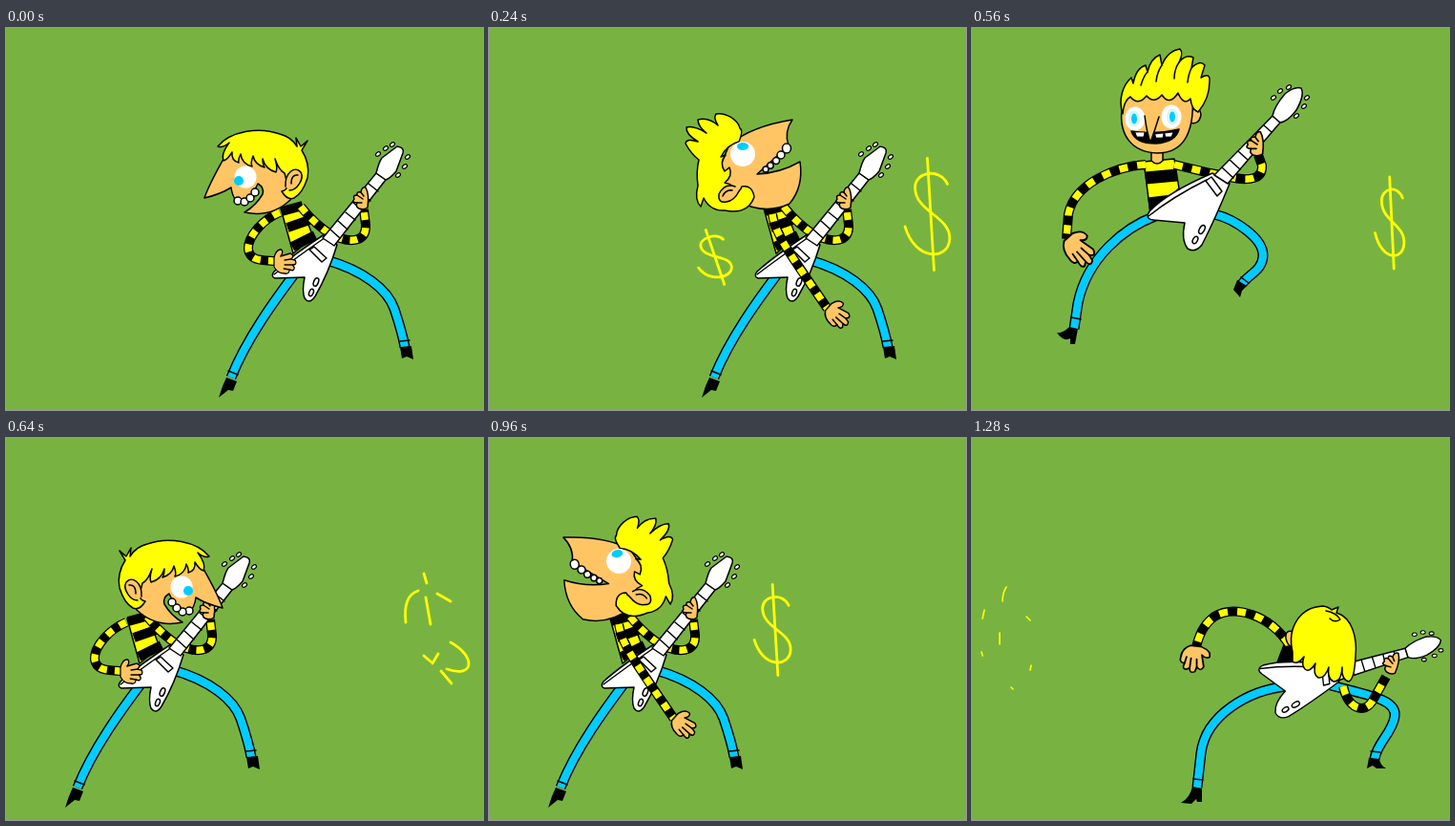
Write an HTML page without scripts that moves like this. It is 500 px wide and 400 px high and loops after 1.36 s.

```html
<!DOCTYPE html>
<html lang="en">
<head>
<meta charset="utf-8">
<title>Guitar jump</title>
<style>
html, body { margin: 0; width: 100%; height: 100%; overflow: hidden; background: #78b342; }
svg { display: block; width: 100vw; height: 100vh; }

.shape { stroke: #000; stroke-width: 1.5; stroke-linejoin: round; stroke-linecap: round; }
.skin { fill: #ffc565; }
.hair { fill: #ff0; }
.white { fill: #fff; }
.eye { fill: #fff; stroke: none; }
.iris { fill: #0cf; stroke: none; }
.halo { stroke: #d5f5ff; stroke-width: 3; }
.line { fill: none; }
.shoe { fill: #000; stroke: none; }
.leg-edge, .leg, .sleeve-edge, .sleeve { fill: none; stroke: #000; }
.leg-edge { stroke-width: 11; }
.leg { stroke: #0cf; stroke-width: 8.2; }
.sleeve-edge { stroke-width: 10; }
.sleeve { stroke: #ff0; stroke-width: 7.4; stroke-dasharray: 8 8; }
.wide { stroke-dasharray: 9 10; }
.bands { fill: none; stroke: #000; stroke-width: 10; }
.thick { stroke-width: 13; }
.coin, .spark { fill: none; stroke: #ff0; stroke-linecap: round; vector-effect: non-scaling-stroke; }
.coin { stroke-width: 2.8; }
.spark { stroke-width: 1.6; }

/* --at: first 80 ms step shown; one1..one4: number of steps held */
.on { visibility: hidden; animation: one1 1360ms step-end infinite; animation-delay: calc(var(--at) * 80ms - 1360ms); }
.x2 { animation-name: one2; }
.x4 { animation-name: one4; }
@keyframes one1 { 0% { visibility: visible; } 5.88235%, 100% { visibility: hidden; } }
@keyframes one2 { 0% { visibility: visible; } 11.76470%, 100% { visibility: hidden; } }
@keyframes one4 { 0% { visibility: visible; } 23.52941%, 100% { visibility: hidden; } }
</style>
</head>
<body>
<svg viewBox="0 0 500 400" preserveAspectRatio="none">
<defs>
  <ellipse id="peg" rx="2.7" ry="1.9" stroke-width="1.2" transform="rotate(-35)"/>
  <g id="guitar" class="shape white">
    <path d="M334 216 Q300 238 281 255 Q277 260 282 262 L313 261 Q310 275 313 283 Q318 290 324 281 Q338 257 347 227 Z"/>
    <path class="line" d="M281 258 Q305 240 335 219"/>
    <path d="M332 220 L388 152 L398 159 L344 228 Z"/>
    <path class="line" d="M340 211 l10 9 M348 202 l10 9 M356 193 l10 8 M364 183 l10 8 M372 173 l10 8 M380 163 l10 8"/>
    <path d="M388 152 Q391 140 394 136 L410 124 Q418 125 416 131 L409 150 Q402 158 398 159 Z"/>
    <path d="M318 232 L323 229 L336 241 L331 245 Z"/>
    <ellipse cx="325" cy="266" rx="2.4" ry="4.5" transform="rotate(22 325 266)"/>
    <ellipse cx="320" cy="277" rx="2.2" ry="3.8" transform="rotate(22 320 277)"/>
    <use href="#peg" x="390" y="132"/><use href="#peg" x="398" y="126"/><use href="#peg" x="405" y="122"/>
    <use href="#peg" x="421" y="135"/><use href="#peg" x="418" y="145"/><use href="#peg" x="411" y="154"/>
  </g>
  <g id="round-guitar" class="shape white">
    <path d="M252 152 Q205 172 186 192 Q181 200 190 201 Q212 203 223 204 Q219 222 226 231 Q234 236 241 227 Q254 202 270 163 Z"/>
    <path class="line" d="M185 197 Q210 177 246 159"/>
    <path d="M254 154 L315 92 L323 99 L268 163 Z"/>
    <path class="line" d="M262 146 l12 11 M270 138 l11 10 M279 129 l10 9 M288 120 l9 8 M297 111 l8 8 M306 102 l8 7"/>
    <path d="M315 92 Q317 82 328 69 Q338 61 345 63 Q349 70 340 86 Q331 98 323 99 Z"/>
    <path d="M245 160 L251 156 L262 171 L257 176 Z"/>
    <ellipse cx="241" cy="211" rx="2.6" ry="4.8" transform="rotate(28 241 211)"/>
    <ellipse cx="234" cy="222" rx="2.4" ry="4" transform="rotate(28 234 222)"/>
    <use href="#peg" x="316" y="73"/><use href="#peg" x="323" y="66"/><use href="#peg" x="332" y="62"/>
    <use href="#peg" x="351" y="73"/><use href="#peg" x="348" y="82"/><use href="#peg" x="340" y="92"/>
  </g>

  <g id="palm" class="shape skin">
    <path d="M0 -5 Q3 -14 9 -13 Q12 -10 8 -6 L20 -9 Q26 -7 21 -3 L26 -2 Q29 3 23 3 L25 6 Q25 10 19 8 Q19 13 13 12 Q4 12 0 5 Z"/>
    <path class="line" d="M21 -3 L13 -2 M23 3 L13 3 M19 8 L12 7"/>
  </g>
  <g id="grip" class="shape skin">
    <path d="M-3 10 Q-7 8 -5 4 Q-11 4 -8 0 Q-10 -4 -5 -4 Q-6 -8 -1 -7 Q0 -13 4 -12 Q8 -5 6 9 Q2 12 -3 10 Z"/>
    <path class="line" d="M-5 4 L0 4 M-5 -4 L1 0 M-1 -7 L2 -3"/>
  </g>

  <g id="stance">
    <g class="leg-edge"><path id="stance-legs" d="M302 258 C284 282 252 325 236 366 M336 243 C375 254 400 274 407 294 C413 312 416 322 418 334"/></g>
    <use href="#stance-legs" class="leg"/>
    <path class="shape" d="M233 359 l10 4 M413 328 l10 -1"/>
    <path class="shoe" d="M231 366 L242 370 L238 380 L233 379 L223 387 L227 375 Z M413 334 L425 333 L427 347 L420 344 L415 346 Z"/>
    <path class="shape hair" d="M288 189 L309 185 L322 219 L301 236 Z"/>
    <path class="bands" d="M289 192 L311 186 M295 209 L318 201 M300 229 L324 217"/>
    <g class="sleeve-edge"><path id="stance-arm" d="M309 187 Q324 206 342 217 L350 220 C365 225 378 222 377 206 L375 190"/></g>
    <use href="#stance-arm" class="sleeve"/>
    <use href="#guitar"/>
    <use href="#grip" x="373" y="179"/>
  </g>

  <g id="strum">
    <use href="#stance"/>
    <g class="sleeve-edge"><path id="strum-arm" d="M287 193 C270 200 253 218 254 232 C256 244 268 243 282 244"/></g>
    <use href="#strum-arm" class="sleeve"/>
    <use href="#palm" transform="translate(281 245) scale(.85 1)"/>
  </g>
  <g id="swing">
    <use href="#stance"/>
    <g class="sleeve-edge"><path id="swing-arm" d="M297 195 C300 215 312 232 355 294"/></g>
    <use href="#swing-arm" class="sleeve"/>
    <use href="#palm" transform="translate(356 292) rotate(42)"/>
  </g>

  <g id="head-down" class="shape">
    <path class="skin" d="M232 130 C222 148 213 163 208 178 Q225 174 236 167 Q237 176 242 182 Q256 181 264 163 Q271 167 269 174 Q262 186 250 193 Q278 199 298 180 L308 150 L290 120 Z"/>
    <g class="white"><circle cx="243" cy="181" r="4"/><circle cx="250" cy="182" r="4"/><circle cx="256" cy="178" r="4"/><circle cx="261" cy="172" r="4"/></g>
    <circle class="eye" cx="251" cy="156" r="11.5"/><circle class="iris" cx="244" cy="160" r="5"/>
    <path class="hair" d="M222 124 C235 108 265 103 287 111 Q299 114 305 124 L304 115 L309 124 L316 118 L310 128 Q319 142 316 157 Q311 173 302 178 Q295 181 289 171 Q295 170 295 164 L292 152 Q286 149 282 137 Q285 147 283 151 Q272 148 269 137 Q269 143 271 146 Q261 143 259 134 Q256 142 258 145 Q247 142 246 132 Q243 138 244 141 Q236 139 237 130 Q232 138 228 139 Q225 132 234 120 Q227 126 222 124 Z"/>
    <path class="skin" d="M293 166 C292 151 303 144 309 151 C313 158 305 170 297 170"/>
    <path class="line" d="M299 163 Q299 153 306 154"/>
  </g>

  <g id="head-up" class="shape">
    <path class="skin" d="M252 122 Q275 103 318 96 Q309 109 314 123 L281 153 Q305 152 326 140 Q330 166 315 184 Q290 196 262 182 L236 160 Z"/>
    <g class="white"><ellipse cx="312" cy="126" rx="4.5" ry="5"/><circle cx="306" cy="133" r="4"/><circle cx="301" cy="139" r="3.5"/><circle cx="295" cy="144" r="3.2"/><circle cx="290" cy="148" r="3"/></g>
    <path class="hair" d="M262 119 Q267 107 263 105 C261 96 248 88 238 90 Q235 94 240 102 Q230 93 219 96 Q219 103 228 110 Q215 102 207 104 Q206 111 219 119 Q207 115 206 121 Q212 132 220 138 Q217 150 219 165 Q215 180 222 187 L225 178 Q232 192 247 191 Q271 196 278 177 Q276 164 265 166 Q264 170 259 173 Q258 164 247 162 Q256 155 252 146 L247 150 Q241 141 248 133 L243 135 Q250 122 262 119 Z"/>
    <circle class="eye" cx="266" cy="132" r="13"/><ellipse class="iris" cx="266" cy="124" rx="6" ry="4"/>
    <path class="skin" d="M258 166 Q247 162 241 174 Q240 184 249 182 Q257 181 262 171"/>
    <path class="line" d="M255 170 Q248 169 245 176"/>
  </g>

  <g id="leap-left">
    <g class="leg-edge"><path id="leap-left-legs" d="M192 197 C160 209 121 240 111 288 L107 315 M254 195 C275 200 306 220 305 239 C304 254 291 257 283 268"/></g>
    <use href="#leap-left-legs" class="leg"/>
    <path class="shape" d="M104 303 l10 2 M282 261 l8 6"/>
    <path class="shoe" d="M102 313 L111 315 L108 331 L103 331 L103 325 Q96 329 89 319 Q95 320 102 313 Z M278 264 L288 270 L283 275 L281 282 L274 274 Z"/>
    <path class="shape hair" d="M180 140 L212 137 L217 168 L187 194 Z"/>
    <path class="bands thick" d="M182 157 L215 154 M185 184 L218 180"/>
    <g class="sleeve-edge"><path id="leap-left-arms" d="M182 143 C150 145 107 163 101 195 L99 221 M212 143 L250 152 L275 157 C291 160 305 158 304 144 L300 133"/></g>
    <use href="#leap-left-arms" class="sleeve wide"/>
    <use href="#palm" transform="translate(101 219) rotate(48) scale(1.35 1.2)"/>
    <use href="#round-guitar"/>
    <use href="#grip" transform="translate(298 122) scale(1.1)"/>
    <g class="shape">
      <path class="skin" d="M188 125 V139 Q194 145 200 139 V125 Z"/>
      <path class="skin" d="M228 88 Q239 80 240 91 Q238 102 228 99"/>
      <path class="skin" d="M157 85 C154 113 168 130 194 131 C218 131 234 115 231 70 L160 68 Z"/>
      <path class="hair" d="M158 90 C153 75 158 60 167 52 L169 58 Q172 42 182 39 L184 46 Q187 32 197 28 L199 39 Q205 24 218 22 Q222 26 217 36 Q224 27 232 31 L230 42 Q239 33 244 39 L240 52 Q250 46 249 56 Q249 74 237 88 Q230 85 229 74 Q222 82 216 68 Q207 82 199 70 Q191 80 183 71 Q174 82 166 72 Q159 76 158 90 Z"/>
      <path class="line" d="M177 60 Q180 50 184 46 M193 56 Q194 46 199 39 M212 53 Q212 43 217 36 M226 57 Q227 48 230 42"/>
      <ellipse class="eye" cx="171" cy="95" rx="10.5" ry="12.5"/><ellipse class="eye" cx="209" cy="93" rx="10.5" ry="12.5"/>
      <ellipse class="iris halo" cx="170" cy="95" rx="4.5" ry="7"/><ellipse class="iris halo" cx="210" cy="93" rx="4.5" ry="7"/>
      <path d="M167 108 Q191 112 217 106 Q214 119 193 121 Q171 121 167 108 Z"/>
      <path class="white" stroke-width=".8" d="M171 109 h10 l-1 5 h-7 Z M192 111 l9 -1 l-1 5 h-7 Z M202 110 l9 -1 l-2 5 h-6 Z"/>
      <path class="skin" d="M181 92 Q183 108 187 120 Q192 106 196 93"/>
    </g>
  </g>

  <g id="leap-right">
    <g class="leg-edge"><path id="leap-right-legs" d="M198 184 C192 213 180 238 168 261 C158 276 145 291 126 313 M250 174 C285 179 302 205 302 229 C302 245 299 254 294 266"/></g>
    <use href="#leap-right-legs" class="leg"/>
    <path class="shape" d="M134 297 l6 9 M291 259 l9 3"/>
    <path class="shoe" d="M122 307 L131 317 L112 336 L114 328 L109 333 L110 320 Z M286 264 L299 267 L293 285 L290 278 L284 276 Z"/>
    <path class="shape hair" d="M195 114 L230 112 L229 168 L190 172 Z"/>
    <path class="bands thick" d="M193 128 L227 126 M190 158 L230 158"/>
    <g class="sleeve-edge"><path id="leap-right-arms" d="M200 114 C175 122 150 160 147 195 M230 114 C238 128 240 142 248 153 L262 165 C280 172 293 165 287 146"/></g>
    <use href="#leap-right-arms" class="sleeve"/>
    <use href="#palm" transform="translate(146 192) rotate(104) scale(.9 1.2)"/>
    <use href="#round-guitar" transform="translate(175 183) rotate(14) scale(.86) translate(-184 -197)"/>
    <use href="#grip" x="285" y="135"/>
    <g class="shape">
      <path class="skin" d="M201 75 L199 108 Q220 121 242 106 Q243 99 240 94 L255 111 Q256 93 250 72 Z"/>
      <path d="M220 92 Q230 100 243 100 Q242 109 233 109 Q222 105 220 92 Z"/>
      <path class="white" stroke-width=".7" d="M224 97 l5 2 -1 4 Z M230 100 h5 l-2 5 Z M236 102 h5 l-2 5 Z"/>
      <ellipse class="eye" cx="236" cy="82" rx="14" ry="10"/><ellipse class="iris" cx="234" cy="82" rx="3.5" ry="7" transform="rotate(20 234 82)"/>
      <path class="hair" d="M202 46 L194 55 L196 48 L193 47 L202 40 Q212 24 235 25 Q260 29 264 50 Q266 68 262 81 Q254 80 254 68 Q252 80 247 79 Q241 78 242 64 Q237 78 232 77 Q227 75 230 63 Q223 78 218 78 Q214 74 217 64 Q210 75 205 75 Q208 86 204 94 L208 101 L202 107 Q207 112 203 113 Q190 104 191 86 Q192 64 202 46 Z"/>
      <path class="skin" d="M204 80 Q196 70 194 83 Q196 98 204 94"/>
      <path class="line" d="M203 84 Q198 82 200 90"/>
    </g>
  </g>

  <g id="crouch">
    <g class="leg-edge"><path id="crouch-legs" d="M330 260 C290 264 245 290 240 330 L236 366 M376 259 C420 270 446 275 443 292 C440 310 425 318 422 336"/></g>
    <use href="#crouch-legs" class="leg"/>
    <path class="shape" d="M232 357 l10 1 M418 328 l10 1"/>
    <path class="shoe" d="M231 365 L241 367 L241 381 L236 381 L235 378 L230 383 L219 382 Q229 376 231 365 Z M416 335 L427 336 Q428 343 434 346 L424 346 L420 343 L414 346 Z"/>
    <path d="M326 217 L345 220 L345 240 L318 238 Z"/>
    <g class="sleeve-edge"><path id="crouch-arms" d="M332 216 C312 185 275 174 254 187 C242 196 238 207 235 219 M389 260 C394 283 411 290 420 275 L434 250"/></g>
    <use href="#crouch-arms" class="sleeve wide"/>
    <use href="#palm" transform="translate(235 218) rotate(98) scale(1.02 1.2)"/>
    <use href="#round-guitar" transform="translate(301 241) rotate(31) scale(.92) translate(-184 -197)"/>
    <use href="#grip" transform="translate(440 236) rotate(15)"/>
    <g class="shape">
      <path class="skin" d="M337 203 Q328 200 329 210 Q331 219 338 220"/>
      <path class="hair" d="M336 224 C330 198 344 177 368 176 Q374 177 377 180 L384 177 L382 183 C399 188 404 210 402 229 Q401 252 395 255 Q387 253 388 240 Q387 256 379 255 Q372 252 374 240 Q370 252 363 251 Q357 248 360 236 Q354 246 349 242 Q345 238 348 229 Q341 238 336 234 Z"/>
      <path class="line" d="M371 181 Q382 183 386 190 Q380 194 375 189"/>
    </g>
  </g>

  <path id="dollar" class="coin" d="M15 -27 C8 -42 -14 -38 -14 -24 C-14 -2 18 2 17 22 C16 42 -14 42 -23 11 M-3 -50 L3 50"/>
  <path id="broken" class="coin" d="M-33 -7 Q-36 -35 -20 -40 M-14 -58 L-11 -48 M-12 -33 L-7 -5 M0 -37 L14 -29 M-14 28 L-7 34 M-5 36 L1 26 M14 14 C40 28 40 52 10 42 M4 44 L15 57"/>
  <path id="sparks" class="spark" d="M-2 -95 v5 M-26 -60 l-5 5 M-31 -25 l4 10 M29 -67 l3 5 M-20 70 l9 8 M18 88 v5 M28 60 l4 -7"/>
</defs>

<rect width="500" height="400" fill="#78b342"/>

<use href="#dollar" class="on" style="--at:2" transform="translate(262 255) scale(.4)"/>
<use href="#dollar" class="on" style="--at:3" transform="translate(237 240) rotate(-14) scale(.85 .6)"/>
<use href="#dollar" class="on" style="--at:4" transform="translate(207 222) rotate(-8) scale(.9)"/>
<use href="#broken" class="on" style="--at:5" transform="translate(181 207)"/>
<use href="#sparks" class="on" style="--at:6" transform="translate(178 205)"/>

<use href="#dollar" class="on" style="--at:2" transform="translate(432 212) scale(.6)"/>
<use href="#dollar" class="on" style="--at:3" transform="translate(463 195) scale(1.17)"/>
<use href="#broken" class="on" style="--at:4" transform="translate(463 195) scale(.95 1.2)"/>
<use href="#sparks" class="on" style="--at:5" transform="translate(463 195)"/>

<use href="#dollar" class="on" style="--at:5" transform="translate(401 222) rotate(6) scale(.38 .45)"/>
<use href="#dollar" class="on" style="--at:6" transform="translate(420 212) rotate(4) scale(.6 .7)"/>
<use href="#dollar" class="on" style="--at:7" transform="translate(440 204) scale(.76 .96)"/>
<use href="#broken" class="on" style="--at:8" transform="translate(452 200)"/>
<use href="#sparks" class="on" style="--at:9" transform="translate(458 198)"/>

<use href="#dollar" class="on" style="--at:10" transform="translate(248 223) rotate(-12) scale(.55 .42)"/>
<use href="#dollar" class="on" style="--at:11" transform="translate(275 211) scale(.7)"/>
<use href="#dollar" class="on" style="--at:12" transform="translate(300 201) scale(.95)"/>
<use href="#broken" class="on" style="--at:13" transform="translate(318 194)"/>

<use href="#dollar" class="on" style="--at:13" transform="translate(68 221) rotate(10) scale(.5)"/>
<use href="#dollar" class="on" style="--at:14" transform="translate(53 218) rotate(6) scale(.8 .68)"/>
<use href="#broken" class="on" style="--at:15" transform="translate(42 213) scale(.8)"/>
<path class="spark on" style="--at:16" d="M36 156 Q32 162 32 171 M13 180 l-2 9 M57 187 l4 4 M29 204 v12 M10 224 l1 4 M62 238 l-1 5 M41 261 l2 2"/>

<g class="on x2" style="--at:0"><use href="#strum"/><use href="#head-down"/></g>
<g class="on x4" style="--at:2"><use href="#swing"/><use href="#head-up"/></g>
<use href="#leap-left" class="on" style="--at:6" transform="translate(40 -8)"/>
<use href="#leap-left" class="on" style="--at:7"/>
<g class="on" style="--at:8"><use href="#strum" x="-161"/><use href="#head-down" transform="translate(435) scale(-1 1)"/></g>
<g class="on x4" style="--at:9"><use href="#swing" x="-161"/><use href="#head-up" transform="translate(136 129) rotate(-11.5) scale(-1 1) translate(-266 -132)"/></g>
<use href="#leap-right" class="on" style="--at:13" transform="translate(-30 0)"/>
<use href="#leap-right" class="on" style="--at:14"/>
<use href="#crouch" class="on x2" style="--at:15"/>
<path class="spark on" style="--at:14" d="M294 109 l3 3 M320 160 l3 12 M344 144 l4 5 M353 226 l-1 11 M325 260 l-5 13 M301 234 l7 8 M292 142 l5 -1"/>
</svg>
</body>
</html>
```
